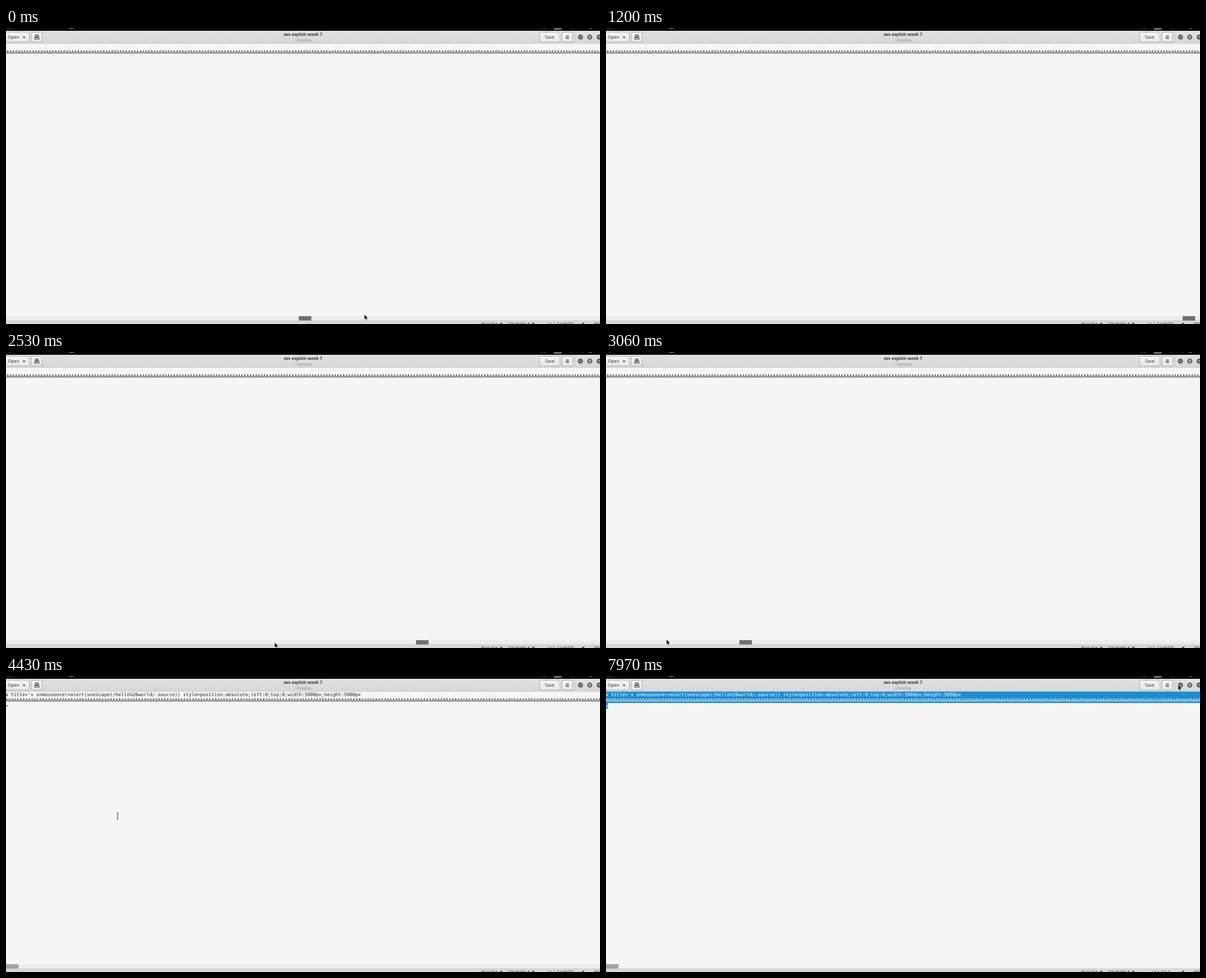
Recreate the animation shown at these times as an HTML page. Size 1059 by 529 pixels, loop 8 s.

```html
<!DOCTYPE html>
<html lang="en">
<head>
<meta charset="utf-8">
<title>Text editor</title>
<style>
html, body { margin: 0; width: 100%; height: 100%; overflow: hidden; background: #f5f5f5; }
svg { display: block; width: 1059px; height: 529px; }
text { font-family: "Noto Sans", "Open Sans", sans-serif; fill: #2e3234; text-rendering: geometricPrecision; }
.mono text { font: 8.365px "DejaVu Sans Mono", monospace; fill: #222; }
.mono.selected text { fill: #fff; }
.label { font-size: 7.8px; }
.status text { font-size: 6.6px; }
.button { fill: url(#face); stroke: #a9a9a9; stroke-width: .9; }
.glyph { fill: none; stroke: #2e3234; stroke-width: 1.1; }
</style>
</head>
<body>
<svg viewBox="0 0 1059 529">
  <defs>
    <linearGradient id="bar" x2="0" y2="1"><stop stop-color="#e1e1e1"/><stop offset="1" stop-color="#d6d6d6"/></linearGradient>
    <linearGradient id="face" x2="0" y2="1"><stop stop-color="#f3f3f3"/><stop offset="1" stop-color="#e8e8e8"/></linearGradient>
  </defs>
  <rect width="1059" height="529" fill="#f5f5f5"/>

  <path id="selection" d="M0 27.8H1059V48.2H3.3V58.2H0Z" fill="#1e8dd0"/>
  <g id="page" class="mono">
    <g id="ends">
      <text x="-6.3" y="36.2">&lt;a title='x onmouseover=alert(unescape(/hello%20world/.source)) style=position:absolute;left:0;top:0;width:5000px;height:5000px</text>
      <text x="-6.3" y="56.3">'&gt;</text>
    </g>
    <text id="run" y="46.2"></text>
  </g>

  <rect id="track" y="515" width="1059" height="8" fill="#ececec"/>
  <rect id="thumb" y="515" width="22.3" height="8"/>

  <g class="status">
    <rect y="523" width="1059" height="6" fill="#d7d7d7"/>
    <rect y="522.7" width="1059" height=".7" fill="#c2c2c2"/>
    <text x="847.5" y="530.6">Plain Text</text>
    <text x="895.5" y="530.6">Tab Width: 8</text>
    <text id="place" x="989" y="530.6" text-anchor="middle"></text>
    <text x="1048" y="530.6">INS</text>
    <path d="M880.5 527h5l-2.5 2.6zM937.5 527h5l-2.5 2.6zM1026.5 527h5l-2.5 2.6z" fill="#2e3234"/>
  </g>

  <rect y="5" width="1059" height="22.5" fill="url(#bar)"/>
  <rect y="27" width="1059" height=".8" fill="#c4c4c4"/>
  <rect width="1059" height="5" fill="#000"/>
  <g fill="none" stroke="#999" stroke-width=".8">
    <path d="M4.5 0v1.5M8.8 0v1.5M954 .3h2M958.5 .3h3M1007 1l2-1M1027 1l1-1M1039.5 0v1.2h5V0"/>
    <path d="M113.500 0v1.200h6V0" stroke="#ddd"/>
    <path d="M977 0h13v3h-13z" fill="#666" stroke="#888" stroke-width=".6"/>
  </g>

  <rect class="button" x="-6" y="7.5" width="47.6" height="17.5" rx="2"/>
  <text class="label" x="3.7" y="19">Open</text>
  <path d="M29.5 15.4h5.4l-2.7 2.8z" fill="#2e3234"/>
  <rect class="button" x="45.5" y="7.5" width="18.7" height="17.5" rx="2"/>
  <path class="glyph" d="M52.5 16.5v-4h4.8v4M51.3 16.3v3.7h7.4v-3.7zM55 13.5v4M53.3 16l1.7 1.8l1.7-1.8"/>
  <text x="529.5" y="14.3" font-size="7.62" font-weight="700" text-anchor="middle">xss exploit week 7</text>
  <text x="529" y="24" font-size="6.4" text-anchor="middle" style="fill:#8b8d8d">~/Desktop</text>
  <rect class="button" x="951.5" y="7.5" width="36" height="17.5" rx="2"/>
  <text class="label" x="969.5" y="19" text-anchor="middle">Save</text>
  <rect class="button" x="991.5" y="7.5" width="18.7" height="17.5" rx="2"/>
  <path class="glyph" d="M998 14h5.6M998 16.3h5.6M998 18.6h5.6"/>
  <rect x="1013.6" y="7" width=".8" height="19" fill="#c4c4c4"/>
  <g fill="#5c6062">
    <circle cx="1024.2" cy="16.2" r="4.5"/>
    <circle cx="1040.8" cy="16.2" r="4.5"/>
    <circle cx="1057.5" cy="16.2" r="4.5"/>
  </g>
  <path d="M1022 16.4h4.4M1039.2 14.6h3.2v3.2h-3.2zM1055.9 14.6l3.2 3.2M1055.9 17.8l3.2-3.2" fill="none" stroke="#d8d8d8" stroke-width="1"/>

  <path id="arrow" d="M0 0V9.2L2.1 7.3L3.6 10.6L5 10L3.5 6.8H6.4Z" fill="#111" stroke="#eee" stroke-width=".4"/>
  <path id="beam" d="M-2 -5h1.4l.6.6l.6-.6h1.4M0 -4.4v9.4M-2 5.5h1.4l.6-.6l.6.6h1.4" fill="none" stroke="#333" stroke-width="1"/>
</svg>
<script>
const LOOP = 8000, STEP = 133, SLACK = 12; // the screen refreshes every STEP ms
const PITCH = 5.036;

// Moments below count refreshes.
const HOME = 27, LEAVE = 32, SELECT = 42, TITLEBAR = 55;

// Each key: refresh, position, and the power of the ease-out leading there.
const pointer = [
  { at: 0, pos: [639, 512] },
  { at: 5, pos: [973, 502], power: 1.2 },
  { at: 7, pos: [1064, 505], power: 1 },
  { at: 14, pos: [1072, 506], power: 1 },
  { at: 15, pos: [1013, 508], power: 1 },
  { at: 19, pos: [479, 519], power: 1 },
  { at: 28, pos: [-3, 512], power: 2.5 },
  { at: 31, pos: [-3, 512], power: 1 },
  { at: 34, pos: [300, 119], power: 1 },
  { at: 45, pos: [300, 119], power: 1 },
  { at: 52, pos: [517, 68], power: 1 },
  { at: 55, pos: [1051, 24], power: 1 },
  { at: 58, pos: [1019, 12], power: 1 },
  { at: 60, pos: [1020, 16], power: 1 }
];

const scroll = [
  { at: 0, pos: [522] },
  { at: 5, pos: [887], power: 1 },
  { at: 10, pos: [1037], power: 1.75 },
  { at: 15, pos: [1037], power: 1 },
  { at: 19, pos: [731], power: 0.6 },
  { at: HOME, pos: [0], power: 1.62 }
];

const $ = id => document.getElementById(id);
const set = (id, name, value) => $(id).setAttribute(name, value);
const show = (id, on) => set(id, "visibility", on ? "visible" : "hidden");

function sample(keys, n) {
  const i = keys.findIndex(k => k.at > n);
  if (i < 0) return keys[keys.length - 1].pos;
  const a = keys[i - 1], b = keys[i];
  const p = 1 - (1 - (n - a.at) / (b.at - a.at)) ** b.power;
  return a.pos.map((v, axis) => v + (b.pos[axis] - v) * p);
}

function draw(time) {
  const n = Math.floor((time % LOOP + SLACK) / STEP);
  const [x, y] = sample(pointer, n);
  const [left] = sample(scroll, n);
  const atHome = n >= HOME, selected = n >= SELECT;
  const isBeam = n >= LEAVE && n < TITLEBAR;

  show("selection", selected);
  show("ends", atHome);
  set("page", "class", selected ? "mono selected" : "mono");
  set("run", "x", atHome ? -6.3 : 0.6);
  show("track", !selected);
  set("thumb", "x", left);
  set("thumb", "fill", n < LEAVE ? "#6f6f6f" : "#a4a4a4");
  $("place").textContent = selected ? "Ln 1, Col 1" : "Ln 1, Col 86536";

  show("beam", isBeam);
  show("arrow", !isBeam);
  set(isBeam ? "beam" : "arrow", "transform", `translate(${x} ${y})`);
}

$("run").textContent = "A".repeat(Math.ceil(1059 / PITCH) + 3);
draw(0);
const start = performance.now();
(function frame() {
  draw(performance.now() - start);
  requestAnimationFrame(frame);
})();
</script>
</body>
</html>
```
